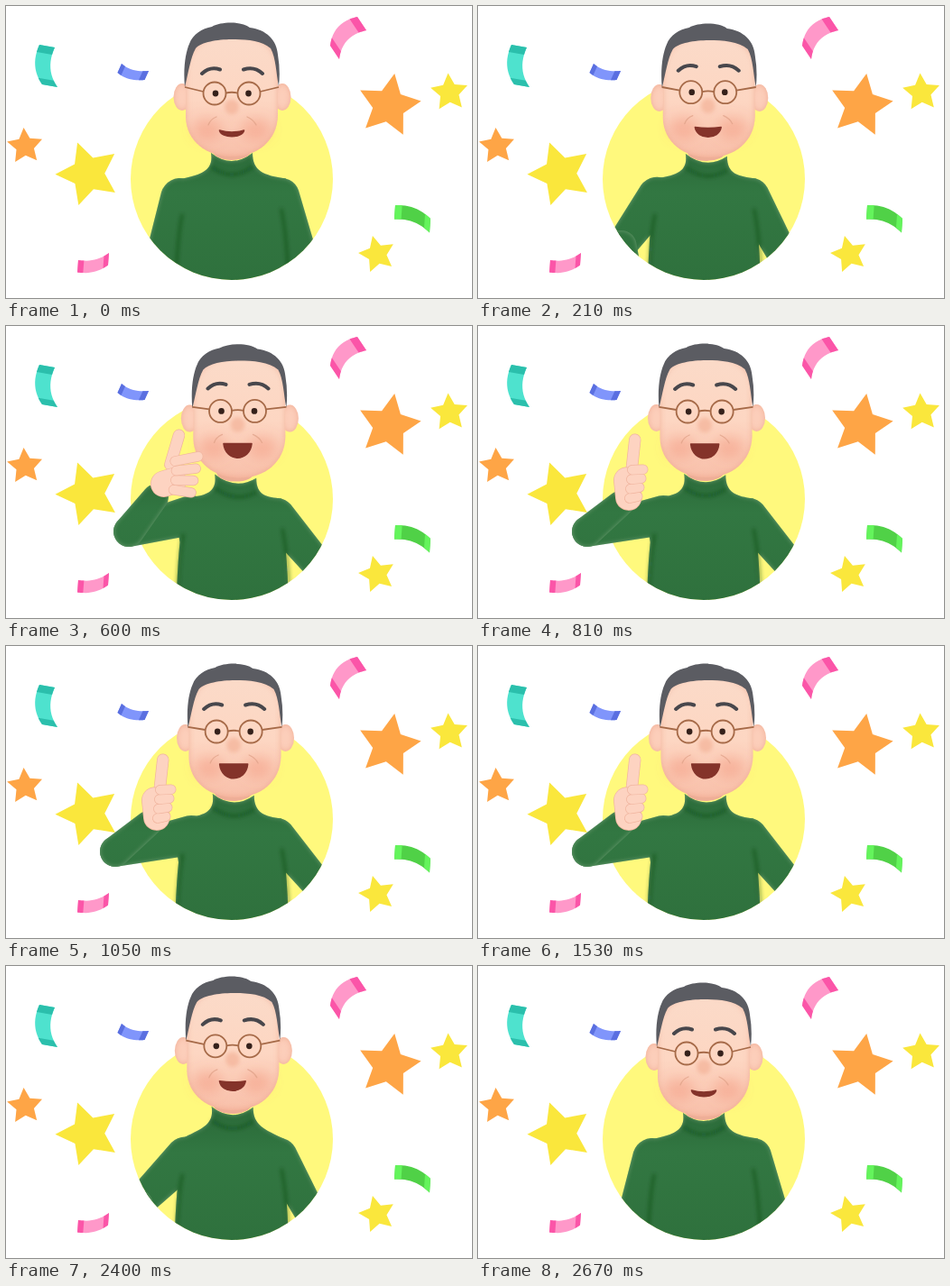
An HTML page for the animation above (2.7 s loop, 516 by 324 pixels).

```html
<!DOCTYPE html>
<html lang="en">
<head>
<meta charset="utf-8">
<title>Thumbs up</title>
<style>
html, body { margin: 0; width: 100%; height: 100%; overflow: hidden; background: #fff; }
svg { display: block; width: 100vw; height: 100vh; }
</style>
</head>
<body>
<svg viewBox="0 0 516 324">
  <defs>
    <clipPath id="stage">
      <circle cx="250" cy="192" r="112"/>
      <rect id="reach" x="80" y="90" width="107" height="165"/>
    </clipPath>
    <linearGradient id="knit" gradientUnits="userSpaceOnUse" x1="0" y1="165" x2="0" y2="305">
      <stop offset="0" stop-color="#2b6b39"/>
      <stop offset=".3" stop-color="#327742"/>
      <stop offset="1" stop-color="#2f713d"/>
    </linearGradient>
    <linearGradient id="skin" gradientUnits="userSpaceOnUse" x1="0" y1="40" x2="0" y2="168">
      <stop offset="0" stop-color="#fbdac8"/>
      <stop offset=".5" stop-color="#fdd6c2"/>
      <stop offset="1" stop-color="#f8bfa9"/>
    </linearGradient>
    <filter id="rimGreen" filterUnits="userSpaceOnUse" x="60" y="80" width="330" height="300" color-interpolation-filters="sRGB">
      <feFlood flood-color="#a9c4a2" flood-opacity=".5"/>
      <feComposite operator="out" in2="SourceAlpha"/>
      <feGaussianBlur stdDeviation="2.5"/>
      <feComposite operator="in" in2="SourceAlpha" result="edge"/>
      <feMerge><feMergeNode in="SourceGraphic"/><feMergeNode in="edge"/></feMerge>
    </filter>
    <filter id="rimSkin" filterUnits="userSpaceOnUse" x="150" y="0" width="210" height="200" color-interpolation-filters="sRGB">
      <feFlood flood-color="#e98f75" flood-opacity=".5"/>
      <feComposite operator="out" in2="SourceAlpha"/>
      <feGaussianBlur stdDeviation="3"/>
      <feComposite operator="in" in2="SourceAlpha" result="edge"/>
      <feMerge><feMergeNode in="SourceGraphic"/><feMergeNode in="edge"/></feMerge>
    </filter>
    <filter id="blur2" filterUnits="userSpaceOnUse" x="150" y="60" width="220" height="300"><feGaussianBlur stdDeviation="2"/></filter>
    <filter id="blur7" filterUnits="userSpaceOnUse" x="150" y="60" width="220" height="300"><feGaussianBlur stdDeviation="7"/></filter>
  </defs>
  <rect width="516" height="324" fill="#fff"/>
  <circle cx="250" cy="192" r="112" fill="#fff97d"/>
  <g id="confetti"></g>

  <g clip-path="url(#stage)">
    <g filter="url(#rimGreen)" fill="url(#knit)">
      <path id="armR"/><path id="armL"/><path id="torso"/>
    </g>
    <g fill="none" stroke="#10401d" stroke-opacity=".5" stroke-width="3" stroke-linecap="round" filter="url(#blur2)">
      <path id="creases" d="M195 232Q190 255 188 308M305 226Q311 255 313 308"/>
      <path id="collar"/>
    </g>
  </g>

  <ellipse id="neck" rx="21" ry="10" fill="#eeae97"/>
  <g id="head">
    <g fill="#fcceba" filter="url(#rimSkin)">
      <ellipse cx="195" cy="101" rx="9.5" ry="15"/>
      <ellipse cx="306" cy="101" rx="9.5" ry="15"/>
    </g>
    <path d="M199 80V124C200 150 222 167 250 167C279 167 300 149 301 122V70C301 46 282 32 250 32C218 32 199 46 199 80Z" fill="url(#skin)" filter="url(#rimSkin)"/>
    <path d="M198 90C196 68 199 51 203 42C207 31 217 25 228 23C239 17 261 17 270 24C288 26 300 38 301 54Q304 72 302 89C299 74 299 58 293 47C283 38 265 37 250 37C234 37 216 40 210 47C204 58 202 74 198 90Z" fill="#5b5c62"/>
    <g id="face">
      <g fill="#ee7c62" fill-opacity=".32" filter="url(#blur7)">
        <ellipse cx="223" cy="137" rx="16" ry="12"/><ellipse cx="277" cy="137" rx="16" ry="12"/>
      </g>
      <ellipse cx="250" cy="112" rx="8" ry="8.5" fill="#f2ab91" fill-opacity=".6" filter="url(#blur2)"/>
      <path d="M224 132Q226 126 233 123M267 123Q274 126 277 132" fill="none" stroke="#dfa086" stroke-opacity=".7" stroke-width="1.3" stroke-linecap="round"/>
      <path id="brows" d="M217 75Q226 66.500 237 70.500M284 75Q275 66.500 263 70.500" fill="none" stroke="#48474c" stroke-width="4" stroke-linecap="round"/>
      <g fill="#35211b"><ellipse id="eyeL" cx="232" cy="97" rx="3.3"/><ellipse id="eyeR" cx="268.500" cy="97" rx="3.3"/></g>
      <g fill="none" stroke="#a66a48" stroke-width="1.8">
        <circle cx="231" cy="97" r="12.500"/><circle cx="269" cy="97" r="12.500"/>
        <path d="M243.500 96.500Q250 95 256.500 96.500"/>
        <path id="temples"/>
      </g>
      <path id="mouth" fill="#84332a" stroke="#84332a" stroke-width="1.6" stroke-linejoin="round"/>
    </g>
  </g>

  <g clip-path="url(#stage)">
    <path id="forearm" fill="url(#knit)" filter="url(#rimGreen)"/>
    <g id="hand" stroke-linecap="round"></g>
  </g>
</svg>
<script>
const NS = 'http://www.w3.org/2000/svg';
const el = id => document.getElementById(id);
const set = (node, attrs) => { for (const k in attrs) node.setAttribute(k, attrs[k]); return node; };
const add = (parent, tag, attrs) => parent.appendChild(set(document.createElementNS(NS, tag), attrs));
const mix = (a, b, k) => a + (b - a) * k;
const rad = deg => deg * Math.PI / 180;

const ORANGE = '#fea546', YELLOW = '#fae73c';
const PINK = ['#fb55a8', '#ff98c9'];

function star(x, y, r, turn, fill) {
  const pts = [];
  for (let i = 0; i < 10; i++) {
    const a = rad(turn - 90 + i * 36), d = i % 2 ? r * 0.5 : r;
    pts.push(`${x + d * Math.cos(a)},${y + d * Math.sin(a)}`);
  }
  add(el('confetti'), 'polygon', { points: pts.join(' '), fill });
}

// A quadratic curve swept along a shift, with two ends in a second colour.
function ribbon(from, bow, to, shift, [end, middle]) {
  const at = t => [0, 1].map(i => mix(mix(from[i], bow[i], t), mix(bow[i], to[i], t), t));
  const band = (t0, t1, fill) => {
    const edge = Array.from({ length: 13 }, (_, i) => at(mix(t0, t1, i / 12)));
    const back = edge.map(([x, y]) => [x + shift[0], y + shift[1]]).reverse();
    add(el('confetti'), 'polygon', { points: edge.concat(back).join(' '), fill });
  };
  band(0, 1, middle);
  band(0, 0.17, end);
  band(0.82, 1, end);
}

star(424, 110.5, 36, 10, ORANGE);
star(91, 186, 36.5, -19, YELLOW);
star(21, 155.5, 20.5, -4, ORANGE);
star(491, 96, 21.5, -4, YELLOW);
star(411, 275.5, 21, -14, YELLOW);
ribbon([37, 43], [26, 67], [40, 87], [17, 3], ['#2bbfac', '#4ee2ce']);
ribbon([128, 64], [139, 74], [158, 72], [-4.5, 10], ['#5a6fe0', '#8095fb']);
ribbon([389, 12], [362, 18], [359, 44], [10, 15], PINK);
ribbon([80, 282], [99, 285], [114, 274], [-1, 13.5], PINK);
ribbon([431, 221], [454, 220], [470, 236], [-1, 15.5], ['#64f45c', '#50d147']);

// Key moments of each movement: time in ms, value.
const tracks = {
  x: [[30, 0], [420, 13], [810, 2.5], [1050, 3.5], [2070, 3.5], [2640, 0]],
  y: [[30, 0], [420, 2], [810, 1], [2070, 1], [2400, -7], [2640, 0]],
  pitch: [[30, 0], [420, -5], [810, -3], [2070, -3], [2640, 0]],
  smile: [[30, 0], [420, 1], [2070, 1], [2670, 0]],
  raise: [[30, 0], [420, 1], [2070, 1], [2700, 0]],
  thumb: [[420, 0], [810, 1], [2070, 1], [2700, 0]]
};

function valueAt(track, t) {
  const i = track.findIndex(key => key[0] > t);
  if (i < 0) return track[track.length - 1][1];
  if (i === 0) return track[0][1];
  const [t0, a] = track[i - 1], [t1, b] = track[i], k = (t - t0) / (t1 - t0);
  return mix(a, b, k * k * (3 - 2 * k));
}

function limb(x1, y1, r1, x2, y2, r2) {
  const d = Math.hypot(x2 - x1, y2 - y1), nx = (y1 - y2) / d, ny = (x2 - x1) / d;
  return `M${x1 + nx * r1} ${y1 + ny * r1}L${x2 + nx * r2} ${y2 + ny * r2}`
    + `A${r2} ${r2} 0 0 0 ${x2 - nx * r2} ${y2 - ny * r2}`
    + `L${x1 - nx * r1} ${y1 - ny * r1}A${r1} ${r1} 0 0 0 ${x1 + nx * r1} ${y1 + ny * r1}Z`;
}

// Hand parts as thick lines, each with an open and a thumbs-up place.
const fingers = [0, 1, 2, 3].map(i => ({
  open: [28 + 4 * Math.sin(i), -10 - 10.7 * i, 56 + 3 * i, -3 - 16 * i],
  fist: [10 + i, -6 - 10.5 * i, 19 + 2 * i, -8 - 10 * i],
  width: 11
}));
const parts = [
  { open: [20, -38, 34, -67], fist: [12, -34, 16, -71], width: 13 },
  { open: [11, -6, 28, -27], fist: [7, -26, 9, -7], width: 29 },
  ...fingers
].map(part => ({
  ...part,
  rim: add(el('hand'), 'line', { stroke: '#f0b49e', 'stroke-width': part.width + 0.4 }),
  fill: add(el('hand'), 'line', { stroke: '#fdd3c1', 'stroke-width': part.width - 1 })
}));

function drawArm(p) {
  const { raise, thumb } = p;
  const sx = mix(193, 205, raise), sy = mix(213, 210, raise);
  const ex = mix(167, 148, raise) - 27 * thumb, ey = mix(296, 228, raise);
  const bend = mix(180, 28 + 22 * thumb, raise ** 3);
  const wx = ex + 48 * Math.sin(rad(bend)), wy = ey - 48 * Math.cos(rad(bend));
  set(el('armL'), { d: limb(sx, sy, 22, ex, ey, 17) });
  set(el('forearm'), { d: limb(ex, ey, 17, wx, wy, 14.5) });
  set(el('reach'), { width: raise > 0.7 ? 107 : 0 });
  set(el('hand'), { transform: `translate(${wx} ${wy}) rotate(${Math.max(0, bend - 50) * 1.2})` });
  for (const part of parts) {
    const [x1, y1, x2, y2] = part.open.map((a, i) => mix(a, part.fist[i], thumb));
    for (const line of [part.rim, part.fill]) set(line, { x1, y1, x2, y2 });
  }
}

function drawBody(p) {
  const nx = p.x / 2, top = 163 + p.y, l = 227 + nx, r = 273 + nx, tilt = top + nx;
  const side = 186 + nx * 0.6, rs = mix(305, 300, p.raise), sy = mix(193, 190, p.raise);
  set(el('torso'), { d: `M${l} ${top}C${l + 3} ${top + 20} ${l - 10} ${top + 24} ${mix(189, 201, p.raise)} ${sy}`
    + `Q184 202 ${side} 216L${side + 4} 240Q${side + 1} 270 ${side} 312H313Q312 270 309 240L${rs + 10} 212`
    + `L${rs + 5} 191.5C${r + 12} ${top + 25} ${r} ${tilt + 20} ${r} ${tilt}Q${250 + nx} ${top + 18} ${l} ${top}Z` });
  set(el('armR'), { d: limb(rs, 211, 20, mix(329, 348, p.raise), mix(282, 268, p.raise), 17) });
  set(el('creases'), { transform: `translate(${nx * 0.3} 0)` });
  set(el('collar'), { d: `M${l + 1} ${top + 16}Q${250 + nx} ${top + 32} ${r - 1} ${tilt + 16}` });
  set(el('neck'), { cx: 250 + nx, cy: 161 + p.y });
}

function drawFace(p, t) {
  const fx = p.pitch * 0.45, { smile } = p;
  set(el('head'), { transform: `translate(${p.x} ${p.y})` });
  set(el('face'), { transform: `translate(${fx} ${p.pitch})` });
  set(el('brows'), { transform: `translate(0 ${-3 * Math.sqrt(smile)})` });
  const blink = t > 1200 && t < 1530 ? Math.sin((t - 1200) / 330 * Math.PI) ** 2 : 0;
  for (const id of ['eyeL', 'eyeR']) set(el(id), { ry: mix(3.4, 0.7, blink) });
  const ty = 90 - p.pitch * 0.6;
  set(el('temples'), { d: `M218.5 95L${198 - fx} ${ty}M281.5 95L${302 - fx} ${ty}` });
  const w = mix(13.5, 15.5, smile), y = 138 - 5 * smile, low = y + 9 + 12 * smile;
  set(el('mouth'), { d: `M${250 - w} ${y}Q250 ${y + 4 * (1 - smile)} ${250 + w} ${y}`
    + `C${248 + w} ${low} ${252 - w} ${low} ${250 - w} ${y}Z` });
}

const LOOP = 2700, STEP = 30;
function draw(ms) {
  const t = Math.floor(ms % LOOP / STEP) * STEP, p = {};
  for (const name in tracks) p[name] = valueAt(tracks[name], t);
  drawBody(p);
  drawArm(p);
  drawFace(p, t);
}

const start = performance.now();
function tick() {
  draw(performance.now() - start);
  requestAnimationFrame(tick);
}
draw(0);
requestAnimationFrame(tick);
</script>
</body>
</html>
```
